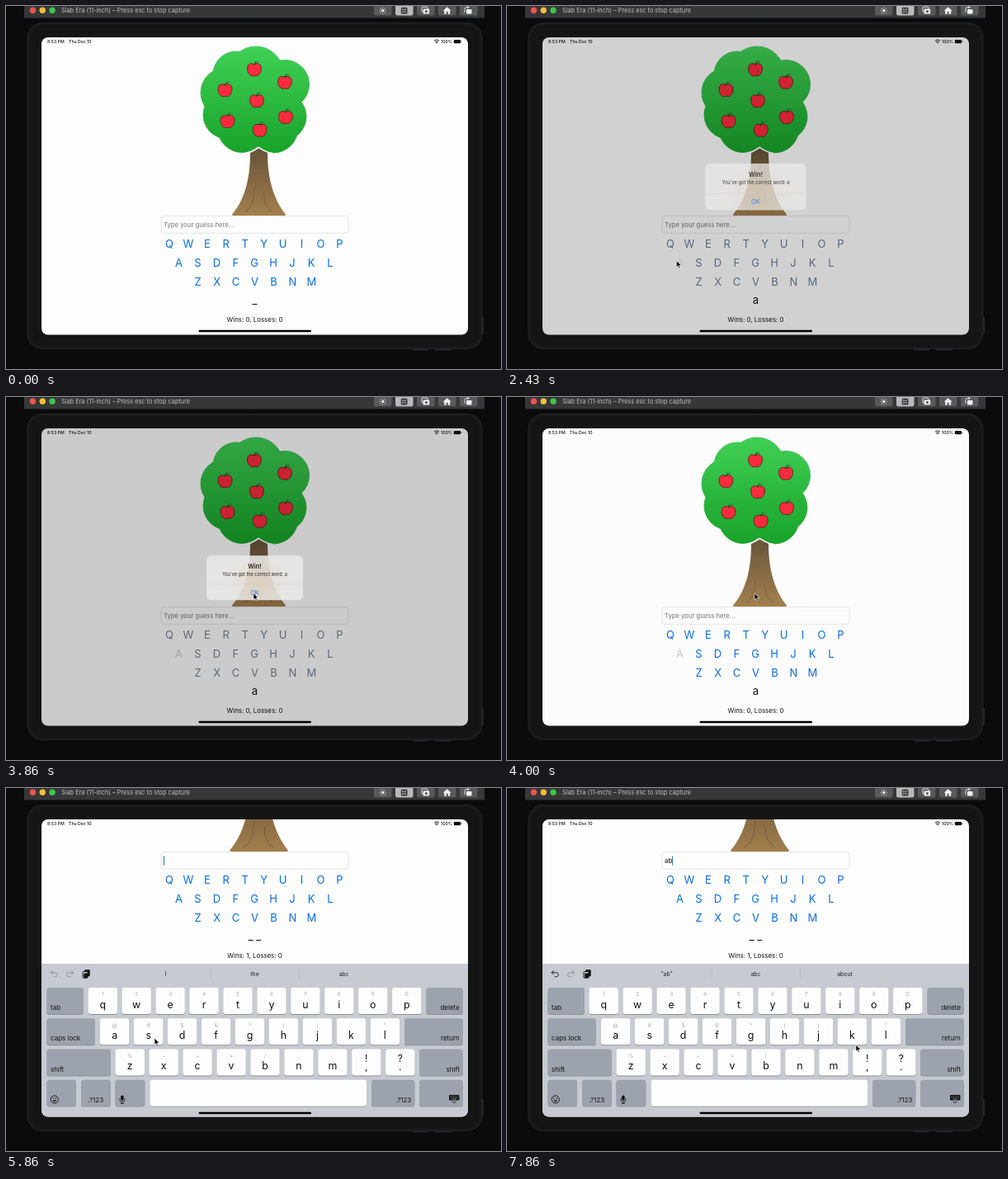
An HTML page with a canvas for the animation above (8000 ms loop, 600 by 440 pixels).

```html
<!DOCTYPE html>
<html lang="en">
<head>
<meta charset="utf-8">
<title>Word guessing game</title>
<style>
html, body { margin: 0; width: 100%; height: 100%; overflow: hidden; background: #0b0b0c; }
canvas { display: block; width: 600px; height: 440px; }
</style>
</head>
<body>
<canvas id="stage"></canvas>
<script>
const LOOP = 8000, STEP = 1000 / 7;
const canvas = document.getElementById('stage');
const c = canvas.getContext('2d');
const ratio = window.devicePixelRatio || 1;
canvas.width = 600 * ratio;
canvas.height = 440 * ratio;

const clamp = v => Math.max(0, Math.min(1, v));
const mix = (a, b, p) => a + (b - a) * p;
const easeOut = u => 1 - Math.pow(1 - clamp(u), 3);
const smooth = u => u * u * (3 - 2 * u);
const blend = (a, b, p) => `rgb(${a.map((v, i) => Math.round(mix(v, b[i], p)))})`;

function box(x, y, w, h, r, fill, stroke, width = 1) {
  c.beginPath();
  c.roundRect(x, y, w, h, r);
  if (fill) { c.fillStyle = fill; c.fill(); }
  if (stroke) { c.strokeStyle = stroke; c.lineWidth = width; c.stroke(); }
}

function text(str, x, y, size, color, align = 'center', weight = 400) {
  c.font = `${weight} ${size}px Inter, Roboto, sans-serif`;
  c.textAlign = align;
  c.fillStyle = color;
  c.fillText(str, x, y);
}

function path(d, x, y, stroke, fill, width = 1) {
  c.save();
  c.translate(x, y);
  const p = new Path2D(d);
  if (fill) { c.fillStyle = fill; c.fill(p); }
  if (stroke) {
    c.strokeStyle = stroke;
    c.lineWidth = width;
    c.lineCap = c.lineJoin = 'round';
    c.stroke(p);
  }
  c.restore();
}

function dot(x, y, r, fill) {
  c.beginPath();
  c.arc(x, y, r, 0, 7);
  c.fillStyle = fill;
  c.fill();
}

function gradient(y0, y1, top, bottom) {
  const g = c.createLinearGradient(0, y0, 0, y1);
  g.addColorStop(0, top);
  g.addColorStop(1, bottom);
  return g;
}

// Window bar and tablet body

function drawWindow() {
  c.fillStyle = '#0b0b0c';
  c.fillRect(0, 0, 600, 440);
  c.fillStyle = '#363739';
  c.fillRect(22, 0, 558, 15);
  c.fillStyle = '#202123';
  c.fillRect(22, 14, 558, 1);
  ['#f0544d', '#f6bd3b', '#3bc748'].forEach((f, i) => dot(32.5 + i * 11.8, 5.3, 3.7, f));
  text('Slab Era (11-inch) – Press esc to stop capture', 67, 8.3, 7.35, '#bfc0c1', 'left');
  for (let i = 0; i < 5; i++) box(446 + i * 26, -4, 21.5, 15.5, 2.5, i === 1 ? '#b8b9ba' : '#58595b');
  drawTools();

  box(493, 414, 19, 3.5, 1, '#252627');
  box(520, 414, 20, 3.5, 1, '#252627');
  box(575, 377, 4, 21, 1, '#252627');
  box(26, 20.5, 551, 395, 18, '#19191a', '#242526');
  box(29, 23.5, 545, 389, 16, '#151516');
}

function drawTools() {
  const ink = '#f0f0f0';
  dot(456.7, 5.5, 1.7, ink);
  for (let i = 0; i < 8; i++) {
    const a = i * Math.PI / 4;
    dot(456.7 + Math.cos(a) * 3.5, 5.5 + Math.sin(a) * 3.5, 0.6, ink);
  }
  box(478.8, 1.8, 7.6, 7.6, 1.2, '#2b2b2c');
  path('M-1.2 -1.2H1.2V1.2H-1.2Z M-2.3 -2.3h1v1h-1Z M1.3 -2.3h1v1h-1Z M-2.3 1.3h1v1h-1Z M1.3 1.3h1v1h-1Z',
    482.6, 5.6, '#d0d0d0', null, 0.5);
  box(504, 1, 7, 6, 1, null, ink, 0.9);
  box(505.6, 3.6, 7.6, 6, 1, ink);
  dot(509.4, 6.6, 1.6, '#58595b');
  path('M-5 .5L0 -4L5 .5H3.5V4.5H1V1.5H-1V4.5H-3.5V.5Z', 534.7, 5.3, null, ink);
  box(558, 4, 6.5, 5.5, 1, ink);
  path('M-4 2V-2Q-4 -4 -1 -4H1M-.5 -5.5L1.2 -4L-.5 -2.5', 560, 5.5, ink, null, 0.9);
}

// Tree

const LOBES = [[303, 82, 33], [279, 83, 28], [266, 105, 30], [268, 132, 29], [286, 148, 29.5],
  [324, 148, 30], [335, 134, 29], [338, 95, 29.5], [303, 115, 45]];
const APPLES = [[301, 76.5], [338, 92], [265.5, 101.5], [304, 114.5], [268.5, 139.3], [339, 134.3], [307.7, 150]];

function drawTree(scale, shift) {
  c.save();
  c.translate(306.5, 254 - shift);
  c.scale(scale, scale);
  c.translate(-306.5, -254);

  c.beginPath();
  for (const [x, y, r] of LOBES) {
    c.moveTo(x + r, y);
    c.arc(x, y, r, 0, Math.PI * 2);
  }
  c.fillStyle = gradient(50, 178, '#40d056', '#18a329');
  c.strokeStyle = '#23a336';
  c.lineWidth = 0.8;
  c.stroke();
  c.fill();

  path('M296 178L306.3 171.8L317 178C317 212 326 237 339 252.5Q339 254 337.5 254H275.5Q274 254 274 252.5C288 237 296 212 296 178Z',
    0, 0, null, gradient(172, 254, '#66533a', '#a37f4d'));
  path('M290 178.5Q300 176.5 306.3 171.3Q313 176.5 323 178.5', 0, 0, '#fdfdfd', null, 1.5);
  path('M301 219C301 236 297 246 289.5 249M312.5 226C313 238 316 246 322.5 248.5', 0, 0, '#715838', null, 0.8);

  for (const [x, y] of APPLES) {
    path('M0 -5.8C3 -7.8 8.6 -7 8.5 -.5C8.4 4.5 5 9 1.8 8.2Q0 7.6 -1.8 8.2C-5 9 -8.4 4.5 -8.5 -.5C-8.6 -7 -3 -7.8 0 -5.8Z',
      x, y, '#4d2022', '#fb2b3d', 0.8);
    path('M0 -5.5Q.2 -8.2 1.8 -9.5', x, y, '#3d2a1d', null, 0.9);
    path('M1 -7.5Q3.2 -10.3 5.2 -9.3Q4 -6.8 1 -7.5Z', x, y, '#25562c', '#3bbf4b', 0.5);
  }
  c.restore();
}

// Game controls

const BLUE = [8, 108, 224], GREY = [130, 130, 130];
const ROWS = ['QWERTYUIOP', 'ASDFGHJKL', 'ZXCVBNM'];
const ROW_X = [198, 209.5, 232.7];

function drawGame(s) {
  drawTree(s.scale, s.shift);
  c.save();
  c.translate(0, -s.shift);
  box(188, 254.5, 227, 20.8, 3, '#fdfdfd', '#e3e3e4', 0.9);
  if (!s.focus) text('Type your guess here...', 191, 267.8, 7.7, '#77777a', 'left');
  text(s.typed, 191, 267.8, 7.8, '#111', 'left');
  if (s.caret) {
    c.fillStyle = '#276a9c';
    c.fillRect(191 + c.measureText(s.typed).width, 259.5, 1, 11);
  }
  const tint = blend(BLUE, GREY, s.alert);
  ROWS.forEach((row, r) => [...row].forEach((ch, i) => {
    const spent = ch === 'A' && s.spent, held = ch === 'A' && s.held;
    c.globalAlpha = held ? 0.2 : spent ? s.fadeA : 1;
    text(ch, ROW_X[r] + i * 22.93, 292.7 + r * 23, 13, spent ? '#c8c8ca' : tint);
  }));
  c.globalAlpha = 1;
  text(s.word, 301.5, 360.8, 13, '#111');
  text(`Wins: ${s.wins}, Losses: 0`, 301.5, 382.5, 7.9, '#111');
  c.restore();
}

function drawStatus() {
  text('8:53 PM', 50, 44.9, 5.2, '#111', 'left', 500);
  text('Thu Dec 10', 76, 44.9, 5.2, '#111', 'left', 500);
  text('100%', 541, 44.9, 5.2, '#111', 'right', 500);
  path('M-2.8 -1.6Q0 -4 2.8 -1.6M-1.6 0Q0 -1.4 1.6 0', 522, 43.5, '#111', null, 0.9);
  dot(522, 44.7, 0.7, '#111');
  box(542.8, 41, 8.2, 4.2, 1, '#111');
  box(551.5, 42.3, 0.8, 1.6, 0.3, '#111');
}

// Keyboard, laid out at its raised position

const KEYS = [
  { x: 99.5, y: 242, main: 'qwertyuiop', alt: '1234567890' },
  { x: 114, y: 279.3, main: 'asdfghjkl', alt: '@#$&*()\'"' },
  { x: 132.5, y: 316.6, main: 'zxcvbnm,.', alt: '%-+=/;:!?' }
];
const WIDE = [
  [49.5, 44.5, 242, 'tab', 'left'], [509.5, 44.3, 242, 'delete', 'right'],
  [49.5, 58.5, 279.3, 'caps lock', 'left'], [483, 70.8, 279.3, 'return', 'right'],
  [49.5, 77.5, 316.6, 'shift', 'left'], [501, 52.8, 316.6, 'shift', 'right'],
  [49.5, 35.5, 353.7, '', 'left'], [91, 35.8, 353.7, '.?123', 'center'],
  [132.5, 35.8, 353.7, '', 'left'], [443, 52.3, 353.7, '.?123', 'right'],
  [501, 52.8, 353.7, '', 'left']
];

function keyCap(x, y, w, fill) {
  box(x, y + 0.9, w, 32, 3, '#8d9096');
  box(x, y, w, 32, 3, fill);
}

function drawKeyboard(s) {
  c.save();
  c.translate(0, s.kbTop - 213);
  c.fillStyle = '#c7cbd1';
  c.fillRect(43, 213, 517, 190);

  const dim = '#8b8f96', undo = s.typed ? '#15161a' : dim;
  const arrow = 'M-1.8 -4L-4.2 -1.6L-1.8 .8M-4 -1.6H1.2Q4 -1.4 4 1Q4 3.5 1.2 3.5H-.5';
  path(arrow, 58.3, 225.3, undo, null, 0.9);
  c.save();
  c.translate(77.5, 225.3);
  c.scale(-1, 1);
  path(arrow, 0, 0, dim, null, 0.9);
  c.restore();
  box(95.2, 220.3, 6.5, 8, 1, '#111');
  box(93, 222.5, 6, 7.8, 1, '#c7cbd1', '#111', 0.9);
  box(94.3, 224.6, 4.7, 5.5, 0.5, '#111');

  s.hints.forEach((h, i) => text(h, 193.5 + i * 108, 227.7, 6.9, '#222'));
  c.fillStyle = '#b3b7be';
  c.fillRect(247.7, 218.5, 0.7, 13);
  c.fillRect(355, 218.5, 0.7, 13);

  for (const { x, y, main, alt } of KEYS) {
    [...main].forEach((ch, i) => {
      const left = x + i * 40.95, mid = left + 17.7;
      keyCap(left, y, 35.4, ch === s.press ? '#b4b9c2' : '#fdfdfd');
      if (ch === ',' || ch === '.') {
        text(alt[i], mid, y + 15.2, 12, '#111');
        text(ch, mid, y + 25.4, 12, '#111');
      } else {
        text(alt[i], mid, y + 10.4, 6.4, '#a9abaf');
        text(ch, mid, y + 24.7, 12.4, '#111');
      }
    });
  }
  for (const [x, w, y, label, align] of WIDE) {
    keyCap(x, y, w, '#9ca2ae');
    const lx = { left: x + 4.5, center: x + w / 2 - 3.5, right: x + w - 4 }[align];
    text(label, align === 'center' ? lx + 3.3 : lx, y + 27, 8, '#111', align);
  }
  keyCap(174.5, 353.7, 262.5, '#fdfdfd');

  c.strokeStyle = '#111';
  c.lineWidth = 0.9;
  c.beginPath();
  c.arc(58.8, 377.5, 4.6, 0, 7);
  c.stroke();
  dot(57.2, 376.2, 0.7, '#111');
  dot(60.4, 376.2, 0.7, '#111');
  path('M-2.4 0Q0 3.8 2.4 0Z', 58.8, 378.5, null, '#111');

  box(139.2, 372.5, 3.4, 6.3, 1.7, '#111');
  path('M-3 -1V.3Q-3 3 0 3Q3 3 3 .3V-1M0 3V5M-1.8 5H1.8', 140.9, 377.5, '#111', null, 0.8);

  box(537, 372, 12.4, 6.4, 1, '#111');
  c.fillStyle = '#9ca2ae';
  for (let r = 0; r < 2; r++) for (let i = 0; i < 5; i++) c.fillRect(538.4 + i * 2.1, 373.4 + r * 1.7, 1, 0.8);
  c.fillRect(540.5, 376.7, 5.4, 0.8);
  path('M-2 0L0 1.5L2 0', 543.2, 380.2, '#111', null, 0.9);
  c.restore();
}

// Alert

function drawAlert(p, scale) {
  if (p <= 0) return;
  c.fillStyle = `rgba(0,0,0,${0.225 * p})`;
  c.fillRect(43, 38, 517, 361);
  c.save();
  c.globalAlpha = p;
  c.translate(301.5, 219.2);
  c.scale(scale, scale);
  const glow = c.createRadialGradient(4, 6, 2, 4, 6, 36);
  glow.addColorStop(0, '#e9dfcf');
  glow.addColorStop(1, '#e8e8e8');
  box(-58.5, -27, 117, 54, 6, glow);
  text('Win!', 0, -11.6, 7.4, '#111', 'center', 600);
  text("You've got the correct word: a", 0, -2.7, 5.5, '#111');
  c.fillStyle = '#cfcfd1';
  c.fillRect(-58.5, 7.4, 117, 0.6);
  text('OK', 0, 20.4, 7.4, '#0f77ea');
  c.restore();
}

// Pointer

const TRACK = [[700, 425, 372], [1710, 205.5, 309], [2700, 205.5, 309], [3430, 300, 238], [4250, 300, 238],
  [4900, 275, 269.5], [5480, 275, 269.5], [5860, 180, 303.5], [6200, 134, 301], [6600, 134, 301],
  [7290, 316, 338], [7500, 316, 338], [7860, 423, 311.5]];

function drawPointer(t) {
  if (t < TRACK[0][0]) return;
  let i = TRACK.findIndex(k => k[0] > t);
  if (i < 0) i = TRACK.length - 1;
  const a = TRACK[i - 1], b = TRACK[i];
  const p = smooth(clamp((t - a[0]) / (b[0] - a[0])));
  path('M0 0V7.6L1.8 6L3 8.9L4.3 8.3L3.1 5.5H5.5Z', mix(a[1], b[1], p), mix(a[2], b[2], p), '#f4f4f4', '#000', 0.6);
}

// Story

const CLICK_A = 2140, SHOW = 2290, HIDE = 3850, ROUND2 = 4140, FOCUS = 5330, TYPE_A = 6420, TYPE_B = 7420;

function stateAt(t) {
  const shown = t < HIDE ? easeOut((t - SHOW) / 350) : 1 - easeOut((t - HIDE) / 200);
  const rise = easeOut((t - FOCUS) / 450);
  const focus = t >= FOCUS;
  const typed = t >= TYPE_B ? 'ab' : t >= TYPE_A ? 'a' : '';
  const lastKey = [TYPE_B, TYPE_A, FOCUS].find(k => t >= k);
  return {
    focus, typed,
    alert: shown,
    alertScale: t < HIDE ? mix(1.2, 1, shown) : 1,
    held: t >= CLICK_A && t < SHOW,
    spent: t >= SHOW && t < ROUND2,
    fadeA: t < HIDE ? 0.15 + 0.85 * Math.pow(shown, 6) : 1,
    word: t < SHOW ? '_' : t < ROUND2 ? 'a' : '_ _',
    wins: t < ROUND2 ? 0 : 1,
    // Focusing drops the safe area at once; the slide then follows the keyboard.
    scale: focus ? 223 / 205 : 1,
    shift: focus ? 185 * rise - 8 : 0,
    kbTop: 398 - 185 * rise,
    caret: focus && (t - lastKey) % 1000 < 650,
    press: t >= TYPE_A && t < TYPE_A + 150 ? 'a' : t >= TYPE_B && t < TYPE_B + 150 ? 'b' : '',
    hints: { '': ['I', 'the', 'abc'], a: ['“a”', 'and', 'at'], ab: ['“ab”', 'abc', 'about'] }[typed]
  };
}

function draw(t) {
  const s = stateAt(t);
  c.setTransform(ratio, 0, 0, ratio, 0, 0);
  drawWindow();
  c.save();
  c.beginPath();
  c.roundRect(43, 38, 517, 360.5, 8);
  c.clip();
  c.fillStyle = '#fdfdfd';
  c.fillRect(43, 38, 517, 361);
  drawGame(s);
  drawStatus();
  if (s.focus) drawKeyboard(s);
  drawAlert(s.alert, s.alertScale);
  box(233.5, 392.7, 136.5, 2.6, 1.3, '#000');
  c.restore();
  drawPointer(t);
}

// The screen refreshes seven times a second, like a recording.
const start = performance.now();
function tick() {
  const t = (performance.now() - start) % LOOP;
  draw(Math.floor((t + 3) / STEP) % 56 * STEP);
  requestAnimationFrame(tick);
}
tick();
</script>
</body>
</html>
```
